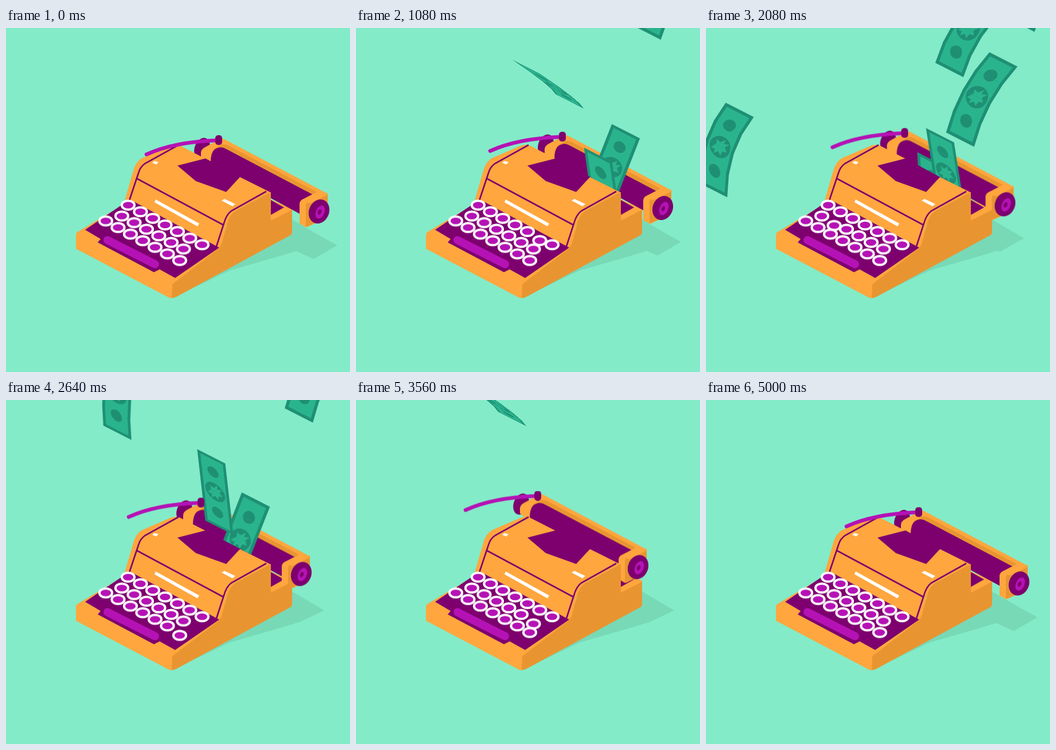
An HTML page without scripts that plays this animation: 600 px wide and 600 px high, repeating every 5040 ms.

```html
<!DOCTYPE html>
<html lang="en">
<head>
<meta charset="utf-8">
<title>Typewriter printing money</title>
<style>
@property --x { syntax: "<number>"; inherits: false; initial-value: 0 }
@property --y { syntax: "<number>"; inherits: false; initial-value: 0 }
@property --c { syntax: "<number>"; inherits: false; initial-value: 0 }
@property --d { syntax: "<number>"; inherits: false; initial-value: 1 }
@property --b { syntax: "<number>"; inherits: true; initial-value: 0 }

html, body { margin: 0; height: 100%; overflow: hidden; background: #83ebc8 }
svg { display: block; width: 100vw; height: 100vh }

.orange { fill: #ffa63e }
.shade { fill: #e89531 }
.plum { fill: #7d006e }
.violet { fill: #b512b5 }
.white { fill: #fff }
.shadow { fill: #78d9b7 }
.ink { fill: #1f8f74 }
.paper { fill: #2ab48e }
.seam { fill: none; stroke: #7d006e; stroke-width: 2.6 }
.ring { fill: #b512b5; stroke: #fff; stroke-width: 4 }

/* Carriage creeps left while typing, then is pulled back by the lever */
.carriage { animation: creep 5040ms linear infinite }
.lever { transform-origin: 371px 195px; animation: pull 5040ms ease-in-out infinite }
@keyframes creep {
  0%, 2.4%, 95.2%, to { transform: translate(0, 0) }
  21.4% { transform: translate(-11px, -6px) }
  31.7% { transform: translate(-17.5px, -9px) }
  41.3% { transform: translate(-24.5px, -12.5px) }
  52.4% { transform: translate(-31px, -16.5px) }
  68.3% { transform: translate(-49px, -26px) }
  70.6%, 78.2% { transform: translate(-54px, -28.5px) }
  90.5% { transform: translate(-11px, -6px) }
}
@keyframes pull {
  0%, 72.2%, 98.4%, to { transform: rotate(0deg) }
  80% { transform: rotate(45deg) }
  90% { transform: rotate(88deg) }
}

.press { animation: press 5040ms linear var(--at) infinite }
@keyframes press {
  0%, 3.2%, to { transform: translateY(0) }
  1.2%, 2% { transform: translateY(5px) }
}

/* A bill is a sheared sheet: x, y place its corner, c and d its length, b its bend */
.bill {
  transform: matrix(.98, .5, var(--c), var(--d), var(--x), var(--y));
  animation: 5040ms linear infinite;
}
/* Four sheared strips approximate the curve of a bent sheet */
.strip { transform: matrix(1, 0, calc(var(--slope) * var(--b)), 1, calc(var(--shift) * var(--b)), 0) }

@keyframes first {
  0%, 3.2% { --x: 430; --y: 276; --c: -.15; --b: 0 }
  12.7% { --x: 470; --y: 10; --c: -.43; --b: .12 }
  19.8%, to { --x: 540; --y: -190; --c: -.6; --b: .15 }
}
@keyframes second {
  0%, 7.9% { --x: 410; --y: 266; --c: -.1; --b: 0 }
  13.9% { --x: 470; --y: 90; --c: -.4; --b: .1 }
  21.43% { --x: 565; --y: -134; --c: -.59; --d: .93; --b: .15 }
  23.8%, to { --x: 590; --y: -200; --c: -.6; --b: .15 }
}
@keyframes third {
  0%, 10.3% { --x: 395; --y: 258; --c: .14; --d: 1; --b: 0 }
  15.5% { --x: 365; --y: 140; --c: .28; --d: .8; --b: 0 }
  21.43% { --x: 273; --y: 56; --c: .54; --d: .43; --b: -.22 }
  27.8%, to { --x: 215; --y: -120; --c: .45; --d: .45; --b: -.2 }
}
@keyframes fourth {
  0%, 16.9% { --x: 455; --y: 290; --c: -.2; --b: 0 }
  21.43% { --x: 446; --y: 168; --c: -.35; --b: 0 }
  31.75% { --x: 587; --y: -45; --c: -.8; --d: .84; --b: .22 }
  36.7%, to { --x: 660; --y: -190; --c: -.8; --d: .84; --b: .22 }
}
@keyframes fifth {
  0%, 19% { --x: 390; --y: 255; --c: .1; --d: 1; --b: 0 }
  21.43% { --x: 398; --y: 209; --c: .14; --d: 1; --b: 0 }
  31.75% { --x: 302; --y: 26; --c: .42; --d: .62; --b: -.13 }
  34.9% { --x: 226; --y: 20; --c: .25; --d: .7; --b: 0 }
  41.27% { --x: 35; --y: 130; --c: -.33; --d: 1; --b: .17 }
  45.6%, to { --x: -110; --y: 210; --c: -.5; --d: 1; --b: .17 }
}
@keyframes sixth {
  0%, 27.8% { --x: 395; --y: 258; --c: -.18; --b: 0 }
  31.75% { --x: 383; --y: 134; --c: -.3; --b: .02 }
  41.27% { --x: 609; --y: -148; --c: -.61; --d: .93; --b: .15 }
  45.6%, to { --x: 680; --y: -270; --c: -.61; --d: .93; --b: .15 }
}
@keyframes seventh {
  0%, 29% { --x: 430; --y: 276; --c: -.2; --b: 0 }
  31.75% { --x: 428; --y: 191; --c: -.27; --b: 0 }
  41.27% { --x: 485; --y: -69; --c: -.61; --d: .93; --b: .15 }
  45.6%, to { --x: 550; --y: -190; --c: -.61; --d: .93; --b: .15 }
}
@keyframes eighth {
  0%, 34.1% { --x: 450; --y: 286; --c: -.2; --b: 0 }
  41.27% { --x: 494; --y: 43; --c: -.54; --b: .13 }
  47.6%, to { --x: 590; --y: -180; --c: -.6; --b: .15 }
}
@keyframes ninth {
  0%, 38.5% { --x: 380; --y: 250; --c: .1; --b: 0 }
  41.27% { --x: 384; --y: 175; --c: .15; --b: 0 }
  52.38% { --x: 183; --y: -85; --c: -.09; --d: .93; --b: .1 }
  57.1%, to { --x: 60; --y: -190; --c: -.25; --d: .93; --b: .15 }
}
@keyframes tenth {
  0%, 40.3% { --x: 365; --y: 242; --c: .04; --b: 0 }
  41.27% { --x: 368; --y: 217; --c: .06; --b: 0 }
  52.38% { --x: 560; --y: -115; --c: -.53; --d: .93; --b: .15 }
  55.6%, to { --x: 620; --y: -220; --c: -.6; --d: .93; --b: .15 }
}
@keyframes eleventh {
  0%, 45.6% { --x: 375; --y: 247; --c: .06; --d: 1; --b: 0 }
  52.38% { --x: 334; --y: 86; --c: .1; --d: .89; --b: 0 }
  59.5% { --x: 150; --y: -20; --c: .3; --d: .7; --b: 0 }
  64.3%, to { --x: -100; --y: 80; --c: -.3; --d: 1; --b: .15 }
}
@keyframes twelfth {
  0%, 48.6% { --x: 420; --y: 271; --c: -.25; --b: 0 }
  52.38% { --x: 411; --y: 162; --c: -.39; --b: 0 }
  61.5%, to { --x: 530; --y: -180; --c: -.6; --b: .15 }
}
@keyframes last {
  0%, 58.5% { --x: 380; --y: 250; --c: .07; --d: 1; --b: 0 }
  63.5% { --x: 330; --y: 90; --c: .28; --d: .8; --b: 0 }
  70.63% { --x: 174; --y: -40; --c: .54; --d: .43; --b: -.22 }
  78.6%, to { --x: -150; --y: 70; --c: -.33; --d: 1; --b: .15 }
}
</style>
</head>
<body>
<svg viewBox="0 0 600 600">
  <defs>
    <clipPath id="slot"><path d="M0 0H600V361L462 288 348 228V600H0z"/></clipPath>
    <clipPath id="strip1"><path d="M-1-1H51V35.3H-1z"/></clipPath>
    <clipPath id="strip2"><path d="M-1 34.7H51V70.3H-1z"/></clipPath>
    <clipPath id="strip3"><path d="M-1 69.7H51V105.3H-1z"/></clipPath>
    <clipPath id="strip4"><path d="M-1 104.7H51V141H-1z"/></clipPath>
    <g id="art">
      <path class="ink" d="M0 0H50V140H0z"/>
      <path class="paper" d="M5 5H45V135H5z"/>
      <g class="ink">
        <circle cx="25" cy="31" r="10"/>
        <circle cx="25" cy="70" r="17.5"/>
        <circle cx="25" cy="110" r="10"/>
      </g>
      <path class="paper" d="M11 77L18 68 16 61 23 63 30 55 29 63 38 60 33 67 38 74 31 75 29 83 24 78 18 84 18 77z"/>
    </g>
    <g id="bill">
      <g class="strip" clip-path="url(#strip1)" style="--slope:-1.5;--shift:0"><use href="#art"/></g>
      <g class="strip" clip-path="url(#strip2)" style="--slope:-.5;--shift:-35"><use href="#art"/></g>
      <g class="strip" clip-path="url(#strip3)" style="--slope:.5;--shift:-105"><use href="#art"/></g>
      <g class="strip" clip-path="url(#strip4)" style="--slope:1.5;--shift:-210"><use href="#art"/></g>
    </g>
    <ellipse id="key" class="ring" rx="11.1" ry="7.8"/>
  </defs>

  <path class="shadow" d="M300 466L499 334 555 367 513 387 470 400 390 423z"/>
  <path class="shadow carriage" d="M500 338L536 356 578 379 537 403 490 382z"/>

  <path class="orange" d="M440 290L499 315V330L462 345z"/>
  <path class="plum" d="M462 300L485 313 462 326z"/>

  <g class="carriage">
    <ellipse class="plum" cx="342" cy="210" rx="13" ry="19" transform="rotate(20 342 210)"/>
    <path class="orange" d="M340 226V217Q341 211 347 208L373 194Q377 192 381 194L559 288Q562 290 561 293L545 310 350 235z"/>
    <path class="shade" d="M362 211L377 203Q382 202 388 205L546 288 533 296z"/>
    <path class="plum" d="M357 240V226Q358 210 374 208Q379 208 384 211L536 291 514 325z"/>
    <path class="orange" d="M341 214L358 206 364 211Q357 218 357 233L340 225z"/>
    <path class="orange" d="M512 307Q512 302 517 299L535 290 548 288H561V304L544 338 526 347Q522 348 519 345L512 341z"/>
    <path class="shade" d="M523 347V309Q524 303 530 300L561 290V305L545 338z"/>
    <path class="orange" d="M514 301L546 284 561 291 530 306z"/>
    <ellipse class="plum" cx="546" cy="320" rx="17.5" ry="21.5" transform="rotate(22 546 320)"/>
    <ellipse class="violet" cx="548" cy="321" rx="7.5" ry="12" transform="rotate(22 548 321)"/>
    <ellipse class="plum" cx="547" cy="321" rx="3" ry="4.5" transform="rotate(22 547 321)"/>
  </g>

  <g clip-path="url(#slot)">
    <use href="#bill" class="bill" style="animation-name:first"/>
    <use href="#bill" class="bill" style="animation-name:second"/>
    <use href="#bill" class="bill" style="animation-name:third"/>
    <use href="#bill" class="bill" style="animation-name:fourth"/>
    <use href="#bill" class="bill" style="animation-name:fifth"/>
    <use href="#bill" class="bill" style="animation-name:sixth"/>
    <use href="#bill" class="bill" style="animation-name:seventh"/>
    <use href="#bill" class="bill" style="animation-name:eighth"/>
    <use href="#bill" class="bill" style="animation-name:tenth"/>
    <use href="#bill" class="bill" style="animation-name:ninth"/>
    <use href="#bill" class="bill" style="animation-name:twelfth"/>
    <use href="#bill" class="bill" style="animation-name:eleventh"/>
    <use href="#bill" class="bill" style="animation-name:last"/>
  </g>

  <!-- Body -->
  <path class="orange" d="M122 361Q122 357 126 355L205 308 222 249Q226 234 237 227L288 205Q297 202 303 205L348 228 340 240 384 283 408 260 462 287 400 319 384 345 376 386 290 448V471Q285 472 280 468L122 385z"/>
  <path class="shade" d="M290 447L372 384 376 377 386 340Q390 326 400 319L462 286V336L499 317V356Q499 360 495 362L297 469Q293 471 289 471z"/>
  <path class="plum" d="M299 240L348 227.5 408 260 384 286 331 267z"/>
  <path class="seam" d="M215 301L231 253Q234 242 243 236L301 204M229 263L380 344M367 381L380 341Q384 326 393 319L454 285"/>
  <path class="white" d="M261 299L337 341 334 346 259 304zM259 232L266 234 262 238 255 235zM381 298L400 307 395 311 376 301z"/>

  <path class="plum" d="M138 352L216 299 368 381 372 383 295 436 268 421 258 426 160 374 165 368z"/>
  <path d="M177 370L260 412" fill="none" stroke="#b512b5" stroke-width="14" stroke-linecap="round"/>

  <!-- Keys, back row to front row -->
  <g transform="translate(213 309)">
    <use href="#key" class="press" style="--at:360ms"/>
    <use href="#key" x="21.5" y="11.5"/>
    <use href="#key" x="43" y="23" class="press" style="--at:1260ms"/>
    <use href="#key" x="64.5" y="34.5"/>
    <use href="#key" x="86" y="46" class="press" style="--at:3200ms"/>
    <use href="#key" x="107.5" y="57.5" class="press" style="--at:1030ms"/>
    <use href="#key" x="129" y="69"/>
  </g>
  <g transform="translate(202 328)">
    <use href="#key"/>
    <use href="#key" x="21.5" y="11.5" class="press" style="--at:2000ms"/>
    <use href="#key" x="43" y="23" class="press" style="--at:2300ms"/>
    <use href="#key" x="64.5" y="34.5"/>
    <use href="#key" x="86" y="46" class="press" style="--at:1520ms"/>
    <use href="#key" x="107.5" y="57.5" class="press" style="--at:3480ms"/>
  </g>
  <g transform="translate(174 336.5)">
    <use href="#key"/>
    <use href="#key" x="21.5" y="11.5"/>
    <use href="#key" x="43" y="23" class="press" style="--at:760ms"/>
    <use href="#key" x="64.5" y="34.5" class="press" style="--at:1760ms"/>
    <use href="#key" x="86" y="46"/>
    <use href="#key" x="107.5" y="57.5" class="press" style="--at:2920ms"/>
    <use href="#key" x="129" y="69" class="press" style="--at:2560ms"/>
  </g>

  <g class="carriage">
    <g class="lever">
      <path d="M245 220.5Q292 199 366 196" fill="none" stroke="#b512b5" stroke-width="6.5" stroke-linecap="round"/>
    </g>
    <rect class="plum" x="365" y="187" width="12" height="17" rx="5"/>
  </g>
</svg>
</body>
</html>
```
